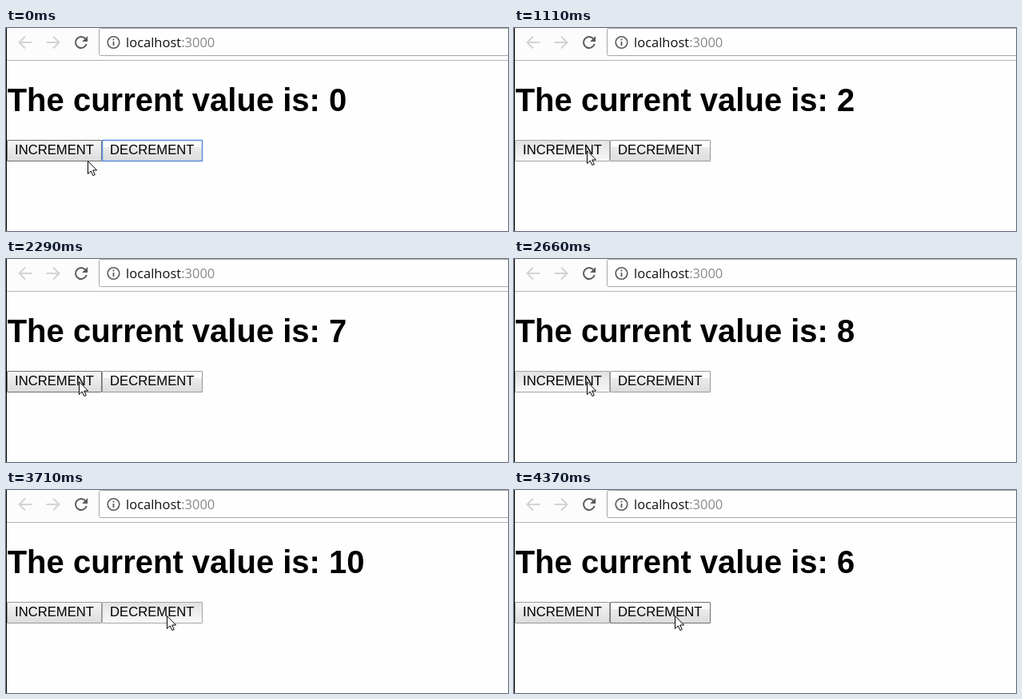
Recreate the animation shown at these times as an HTML page. Size 628x254 px, loop 6620 ms.

```html
<!DOCTYPE html>
<html lang="en">
<head>
<meta charset="utf-8">
<title>Counter</title>
<style>
  html, body { margin: 0; width: 100%; height: 100%; overflow: hidden; background: #fefefe; }
  svg { display: block; }
  text { white-space: pre; }
  .page { font-family: "Liberation Sans", Arial, sans-serif; fill: #000; }
  .url { font: 16.5px "Open Sans", "Noto Sans", sans-serif; fill: #111; }
  .line { fill: none; stroke-width: 2; }
</style>
</head>
<body>
<svg width="628" height="254" viewBox="0 0 628 254">
  <defs>
    <linearGradient id="up" x2="0" y2="1">
      <stop offset="0" stop-color="#f6f6f6"/>
      <stop offset="1" stop-color="#dcdcdc"/>
    </linearGradient>
    <linearGradient id="split" x2="0" y2="1">
      <stop offset="0" stop-color="#fdfdfd"/>
      <stop offset=".32" stop-color="#fafafa"/>
      <stop offset=".34" stop-color="#ebebeb"/>
      <stop offset="1" stop-color="#dcdcdc"/>
    </linearGradient>
    <linearGradient id="down" x2="0" y2="1">
      <stop offset="0" stop-color="#e2e2e2"/>
      <stop offset="1" stop-color="#f8f8f8"/>
    </linearGradient>
  </defs>
  <rect width="628" height="254" fill="#fefefe"/>

  <!-- toolbar -->
  <rect width="628" height="40" fill="#fcfcfc"/>
  <g class="line" stroke="#d3d3d3">
    <path d="M32.5 18H17M24 10.5L16.5 18L24 25.5"/>
    <path d="M50.5 18H66M59 10.5L66.5 18L59 25.5"/>
  </g>
  <g transform="translate(-.5 0)">
    <path class="line" stroke="#5a5a5a" d="M101.2 20A7 7 0 1 1 99.6 13.2"/>
    <path fill="#5a5a5a" d="M102.6 10v7h-7z"/>
  </g>
  <rect x="116.5" y=".5" width="530" height="34" rx="2" fill="#fefefe" stroke="#a8a8a8"/>
  <circle cx="134.5" cy="18" r="7.3" fill="none" stroke="#5a5a5a" stroke-width="1.6"/>
  <path fill="#5a5a5a" d="M133.6 17h1.8v5h-1.8zM133.6 13.6h1.8v1.8h-1.8z"/>
  <text class="url" x="150" y="24">localhost<tspan fill="#888">:3000</tspan></text>
  <rect y="40" width="628" height="1" fill="#b4b4b4"/>
  <rect width="1" height="254" fill="#000"/>

  <!-- page -->
  <text id="title" class="page" x="1.7" y="104" font-size="40" font-weight="700"></text>
  <g class="page" font-size="16.67">
    <rect id="inc" x="1.5" y="140.5" width="118" height="26" rx=".5"/>
    <rect id="dec" x="120.5" y="140.5" width="125" height="26" rx=".5"/>
    <text x="11" y="158">INCREMENT</text>
    <text x="130" y="158">DECREMENT</text>
  </g>
  <path id="cursor" fill="#fff" stroke="#000" d="M.5 .7V16.6L4.2 13L6.9 18.6L9.3 17.5L6.7 12H11.6Z"/>
</svg>
<script>
const LOOP = 6620;
const FIRST_PRESS = 510;
const el = id => document.getElementById(id);
const [title, inc, dec, cursor] = ["title", "inc", "dec", "cursor"].map(el);

// evenly spaced clicks, each held for a while
const burst = (start, count, period, hold) =>
  Array.from({ length: count }, (_, i) => ({ press: start + i * period, release: start + i * period + hold }));

const incClicks = [...burst(FIRST_PRESS, 6, 295, 140), ...burst(2205, 2, 150, 75), ...burst(2660, 2, 390, 140)];
const decClicks = [...burst(3710, 1, 0, 140), ...burst(3930, 2, 150, 75), ...burst(4230, 1, 0, 140)];

// pointer stops: time, x, y
const stops = [
  [0, 102, 166], [120, 101, 166], [250, 101, 166], [430, 91, 153],
  [3150, 91, 153], [3200, 125, 173], [3270, 160, 158], [3480, 201, 157], [LOOP, 201, 157]
];

const released = (clicks, t) => clicks.filter(c => t >= c.release).length;
const isDown = (clicks, t) => clicks.some(c => t >= c.press && t < c.release);

function pointer(t) {
  const i = stops.findIndex(s => t < s[0]);
  const [t0, x0, y0] = stops[i - 1];
  const [t1, x1, y1] = stops[i];
  const k = (t - t0) / (t1 - t0);
  return [Math.round(x0 + (x1 - x0) * k), Math.round(y0 + (y1 - y0) * k)];
}

function paint(button, face, down, hover, focus) {
  const edge = focus ? "#5b8fdc" : down ? "#a6a6a6" : hover ? "#707070" : "#999";
  button.setAttribute("fill", `url(#${down ? "down" : face})`);
  button.setAttribute("stroke", edge);
  button.setAttribute("stroke-width", focus ? 1.5 : 1);
}

function draw(t) {
  const [x, y] = pointer(t);
  const over = y < 167;
  title.textContent = "The current value is: " + (released(incClicks, t) - released(decClicks, t));
  paint(inc, "up", isDown(incClicks, t), over && x < 120, false);
  paint(dec, "split", isDown(decClicks, t), over && x >= 120, t < FIRST_PRESS);
  cursor.setAttribute("transform", `translate(${x} ${y})`);
}

function tick() {
  draw(performance.now() % LOOP);
  requestAnimationFrame(tick);
}
tick();
</script>
</body>
</html>
```
